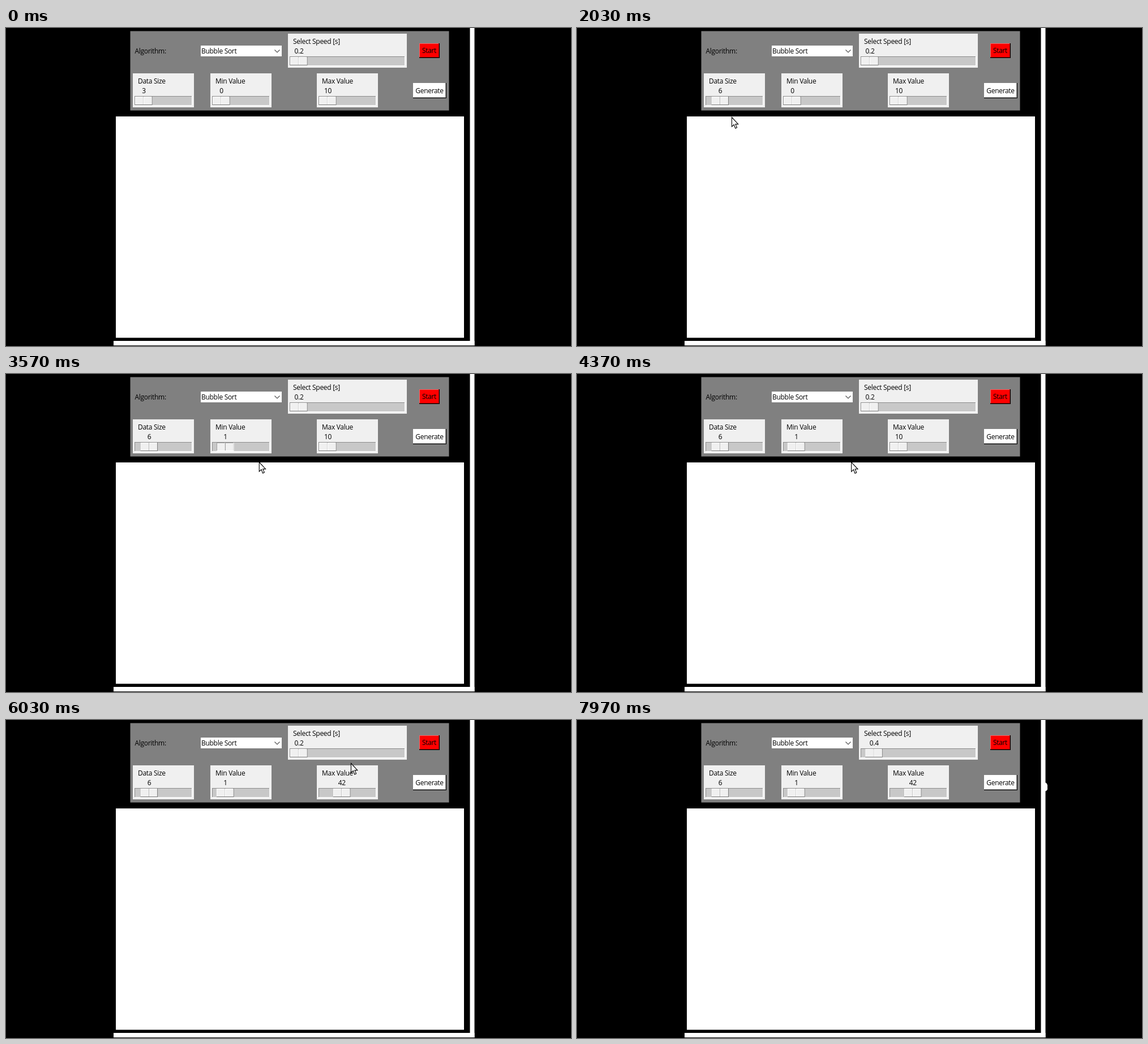
An HTML page that plays this animation: 998x561 px, repeating every 8000 ms.

```html
<!DOCTYPE html>
<html lang="en">
<head>
<meta charset="utf-8">
<title>Sorting controls</title>
<style>
  html, body { margin: 0; width: 100%; height: 100%; overflow: hidden; background: #000; }
  svg { display: block; width: 100%; height: 100%; }
  text { font: 12px "Open Sans", "Noto Sans", sans-serif; letter-spacing: -0.3px; fill: #000; }
  .mid { text-anchor: middle; }
</style>
</head>
<body>
<svg id="stage" viewBox="0 0 998 561"></svg>
<script>
const NS = "http://www.w3.org/2000/svg";
const stage = document.getElementById("stage");
const LOOP = 8000;

function add(parent, tag, attrs, content) {
  const node = document.createElementNS(NS, tag);
  for (const key in attrs) node.setAttribute(key, attrs[key]);
  if (content !== undefined) node.textContent = content;
  parent.appendChild(node);
  return node;
}
const box = (x, y, width, height, fill, parent = stage) =>
  add(parent, "rect", { x, y, width, height, fill });
const label = (x, y, content, cls = "") =>
  add(stage, "text", { x, y, class: cls }, content);
const show = (node, on) => node.setAttribute("visibility", on ? "visible" : "hidden");
const place = (node, x, y) => node.setAttribute("transform", `translate(${x} ${y})`);

// Box with a one pixel light and dark edge
function bevel(x, y, w, h, fill, light, dark, parent = stage) {
  box(x, y, w, h, dark, parent);
  box(x, y, w - 1, h - 1, light, parent);
  box(x + 1, y + 1, w - 2, h - 2, fill, parent);
}

function button(x, y, w, h, fill, light, dark, content) {
  box(x, y, w, h, "#000");
  bevel(x, y, w - 1, h - 1, fill, light, dark);
  label(x + w / 2 - 0.5, y + h / 2 + 4, content, "mid");
}

function thumb(parent, light, dark) {
  const g = add(parent, "g", {});
  for (const x of [0, 15]) bevel(x, 0, 15.5, 15, "#f0f0f0", light, dark, g);
  return g;
}

function slider(x, y, w, title) {
  box(x, y, w, 60, "#f0f0f0");
  label(x + 9, y + 18, title);
  bevel(x + 3, y + 40, w - 6, 17, "#c8c8c8", "#8c8c8c", "#fff");
  const value = label(0, y + 35, "", "mid");
  const grip = add(stage, "g", {});
  const up = thumb(grip, "#fff", "#757575");
  const down = thumb(grip, "#a0a0a0", "#fff");
  return (shift, content, pressed) => {
    place(grip, x + 4 + shift, y + 41);
    value.setAttribute("x", x + 19.5 + shift);
    value.textContent = content;
    show(up, !pressed);
    show(down, pressed);
  };
}

box(0, 0, 998, 561, "#000");
box(819.5, 0, 8, 560, "#fff");
box(190, 552, 637.5, 8, "#fff");
box(219.5, 5.5, 563, 140, "#808080");
box(194, 156, 615, 390.5, "#fff");

label(227.5, 45, "Algorithm:");
box(344, 31, 143, 19, "#fff");
label(345, 45, "Bubble Sort");
add(stage, "path", { d: "M474.5 38.5l4.5 4.5 4.5-4.5", fill: "none", stroke: "#555", "stroke-width": 1.2 });
button(730, 27, 36, 26, "#f00", "#ff6060", "#900", "Start");
button(719, 97, 59, 27, "#fff", "#fff", "#999", "Generate");

// Each drag: hand = grab point, glide = approach, hold = button down, pull = thumb moves
const drags = [
  { draw: slider(224, 80, 108, "Data Size"), from: 3, to: 6, step: 1, px: 70 / 22,
    hand: [261, 157], glide: [300, 1330], hold: [1570, 2030], pull: [1570, 1730] },
  { draw: slider(361, 80, 108, "Min Value"), from: 0, to: 1, step: 1, px: 7,
    hand: [438, 155], glide: [2030, 2700], hold: [2730, 3770], pull: [2870, 3000] },
  { draw: slider(549, 80, 108, "Max Value"), from: 10, to: 42, step: 1, px: 7 / 9,
    hand: [657, 156], glide: [4250, 4700], hold: [4920, 5420], pull: [5070, 5400] },
  { draw: slider(498, 10, 210, "Select Speed [s]"), from: 0.2, to: 0.4, step: 0.1, px: 36,
    hand: [609, 76], glide: [5460, 5880], hold: [6650, 7150], pull: [6800, 7050] }
];
const enter = [300, 7950], first = [330, 326];
const leave = { hand: [818, 106], glide: [7350, 7960] };
const REACH = 1.25; // pointer travel per pixel of thumb travel

const pointer = add(stage, "path", {
  d: "M.5.5V17L4.3 13.5 6.8 20 9.6 18.8 7 12.6H11.8Z",
  fill: "#fff", stroke: "#000", "stroke-width": 1.1
});
const edge = add(stage, "path", { d: "M827 110.5l2 .5 2 3.5v8l-2 2.5-2 .5z", fill: "#fff" });

const ramp = (t, [a, b]) => Math.min(1, Math.max(0, (t - a) / (b - a)));
const ease = u => u * u * (3 - 2 * u);

function render(t) {
  let [x, y] = first;
  const approach = ({ hand, glide }) => {
    const k = ease(ramp(t, glide));
    x += (hand[0] - x) * k;
    y += (hand[1] - y) * k;
  };
  for (const d of drags) {
    const pulled = ramp(t, d.pull), span = d.to - d.from;
    const moved = Math.round(span * pulled / d.step) * d.step;
    d.draw(moved * d.px, (d.from + moved).toFixed(d.step < 1 ? 1 : 0), t >= d.hold[0] && t < d.hold[1]);
    approach(d);
    x += span * d.px * REACH * pulled;
  }
  approach(leave);

  place(pointer, x, y);
  show(pointer, t >= enter[0] && t < enter[1]);
  show(edge, t >= enter[1]);
}

const start = performance.now();
function tick() {
  render((performance.now() - start) % LOOP);
  requestAnimationFrame(tick);
}
render(0);
requestAnimationFrame(tick);
</script>
</body>
</html>
```
